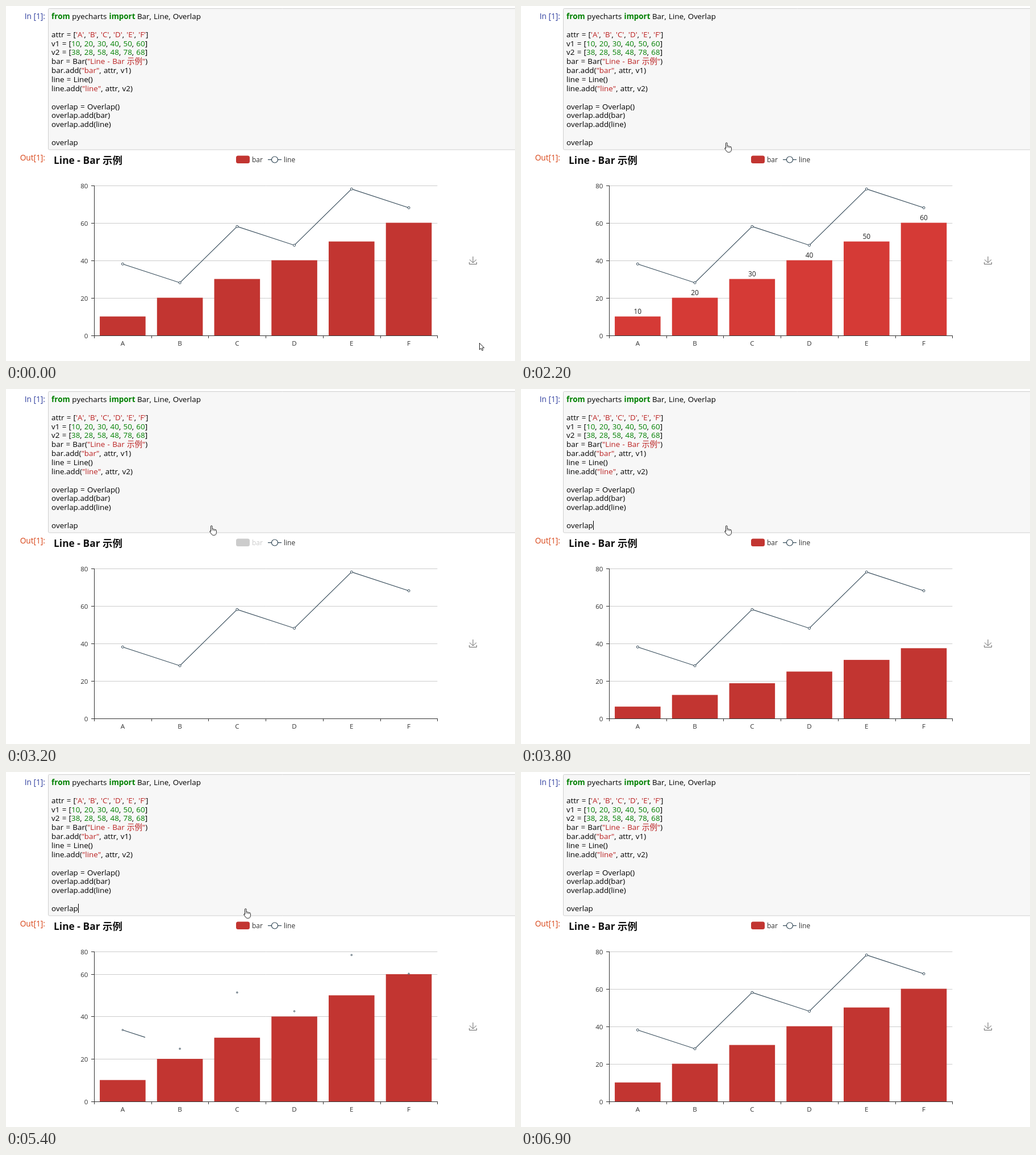
Write an HTML page with a canvas that moves like this. It is 896 px wide and 625 px high and loops after 8400 ms.

```html
<!DOCTYPE html>
<html lang="en">
<head>
<meta charset="utf-8">
<style>
  html, body { margin: 0; width: 100%; height: 100%; overflow: hidden; background: #fff; }
  canvas { display: block; }
</style>
</head>
<body>
<canvas id="stage" width="896" height="625"></canvas>
<script>
const ctx = document.getElementById('stage').getContext('2d');
const LOOP = 8400, STEP = 100;
const FONT = '"Open Sans", "Noto Sans CJK SC", "Noto Sans CJK", sans-serif';
const RED = '#c23531', RED_HOVER = '#d53a36', NAVY = '#2f4554', DARK = '#333', OFF = '#ccc';
const LEFT = 155, WIDTH = 604.4, BASE = 579.6, HEIGHT = 264, BAND = WIDTH / 6;
const AXIS = Math.round(BASE);
const bars = [10, 20, 30, 40, 50, 60], points = [38, 28, 58, 48, 78, 68];

const source = `from pyecharts import Bar, Line, Overlap

attr = ['A', 'B', 'C', 'D', 'E', 'F']
v1 = [10, 20, 30, 40, 50, 60]
v2 = [38, 28, 58, 48, 78, 68]
bar = Bar("Line - Bar 示例")
bar.add("bar", attr, v1)
line = Line()
line.add("line", attr, v2)

overlap = Overlap()
overlap.add(bar)
overlap.add(line)

overlap`.split('\n');

// Pointer positions: time, x, y
const pointerPath = [
  [0, 833, 593], [400, 833, 593], [600, 830, 575], [900, 808, 465], [1300, 768, 323],
  [1400, 715, 292], [1500, 640, 258], [1600, 560, 231], [1800, 450, 207], [2000, 380, 222],
  [2200, 358, 240], [3900, 358, 240], [4300, 418, 240], [5400, 418, 240], [5600, 385, 195],
  [5900, 245, 127], [6100, 145, 148], [6200, 109, 189], [6300, 72, 290], [6600, 2, 612]
];
const caretTimes = [[2700, 3200], [3700, 4200], [4600, 5100], [5400, 5900], [6400, 6900]];

const clamp = v => Math.max(0, Math.min(1, v));
const easeOut = v => 1 - (1 - clamp(v)) ** 3;
const within = (t, from, to) => t >= from && t < to;
const centre = i => LEFT + BAND * (i + 0.5);
const yAt = (value, max) => BASE - HEIGHT * value / max;

function text(str, x, y, { size = 12, color = DARK, align = 'left', weight = 400 } = {}) {
  ctx.font = `${weight} ${size}px ${FONT}`;
  ctx.fillStyle = color;
  ctx.textAlign = align;
  ctx.fillText(str, x, y);
  return ctx.measureText(str).width;
}

function stroke(coords, color, width = 1) {
  ctx.strokeStyle = color;
  ctx.lineWidth = width;
  ctx.beginPath();
  coords.forEach(([x, y]) => ctx.lineTo(x, y));
  ctx.stroke();
}

function ring(x, y, r, color, width = 1) {
  ctx.beginPath();
  ctx.arc(x, y, r, 0, Math.PI * 2);
  ctx.fillStyle = '#fff';
  ctx.strokeStyle = color;
  ctx.lineWidth = width;
  ctx.fill();
  ctx.stroke();
}

function drawCode(t) {
  ctx.fillStyle = '#f7f7f7';
  ctx.strokeStyle = '#cfcfcf';
  ctx.lineWidth = 1;
  ctx.beginPath();
  ctx.roundRect(74.5, 4.5, 840, 248.5, 2);
  ctx.fill();
  ctx.stroke();
  text('In [1]:', 69, 22.5, { size: 13.7, color: '#303f9f', align: 'right' });
  text('Out[1]:', 69, 272, { size: 13.7, color: '#d84315', align: 'right' });
  ctx.save();
  ctx.fontKerning = 'none';
  ctx.wordSpacing = '0.8px';
  source.forEach((line, i) => {
    let x = 80;
    for (const part of line.split(/("[^"]*"|'[^']*'|\b\d+|\bfrom\b|\bimport\b)/)) {
      const keyword = part === 'from' || part === 'import';
      const color = /^["']/.test(part) ? '#ba2121' : keyword || /^\d/.test(part) ? '#008000' : '#000';
      x += text(part, x, 23 + 15.86 * i, { size: 13.4, color, weight: keyword ? 700 : 400 });
    }
  });
  ctx.restore();
  if (caretTimes.some(([from, to]) => within(t, from, to))) {
    ctx.fillStyle = '#000';
    ctx.fillRect(127, 232, 1, 16);
  }
}

function drawLegend(t) {
  const barOff = within(t, 2700, 3600), lineOff = within(t, 4600, 5400);
  text('Line - Bar 示例', 84, 278, { size: 17.4, color: '#111', weight: 700 });
  ctx.fillStyle = barOff ? OFF : RED;
  ctx.beginPath();
  ctx.roundRect(405, 263.5, 24, 13.5, 3.5);
  ctx.fill();
  text('bar', 433, 275, { color: barOff ? OFF : DARK });
  const color = lineOff ? OFF : NAVY;
  stroke([[461, 270.5], [485, 270.5]], color, 1.2);
  ring(473, 270.5, 5.5, color, 1.2);
  text('line', 489, 275, { color: lineOff ? OFF : DARK });
}

function drawAxes(t, max) {
  const ticks = [0, 20, 40, 60].map(v => [v, yAt(v, max)]);
  if (within(t, 4600, 5400)) [10, 30, 50].forEach(v => ticks.push([v, yAt(v, 60)]));
  else ticks.push([80, yAt(80, 80)]);
  for (const [value, exact] of ticks) {
    const y = Math.round(exact) + 0.5;
    if (value) stroke([[LEFT, y], [LEFT + WIDTH, y]], OFF);
    stroke([[LEFT - 5, y], [LEFT, y]], DARK);
    text(value, 144.5, y + 4, { size: 11.6, align: 'right' });
  }
  stroke([[LEFT + 0.5, AXIS - HEIGHT], [LEFT + 0.5, AXIS + 1]], DARK);
  stroke([[LEFT, AXIS + 0.5], [LEFT + WIDTH + 0.6, AXIS + 0.5]], DARK);
  for (let i = 0; i <= 6; i++) {
    const x = Math.round(LEFT + BAND * i) + 0.5;
    stroke([[x, AXIS], [x, AXIS + 5]], DARK);
  }
  [...'ABCDEF'].forEach((name, i) => text(name, centre(i), 598, { size: 11.6, align: 'center' }));
}

function drawBars(t, max) {
  if (within(t, 3000, 3600)) return;
  const hover = within(t, 2100, 3000);
  const shrink = within(t, 2700, 3000) ? 1 - easeOut((t - 2650) / 300) : 1;
  const grow = t >= 3600 ? easeOut((t - 3550) / 900) : 1;
  bars.forEach((value, i) => {
    const top = yAt(value, max), x = LEFT + BAND * (i + 0.1);
    ctx.fillStyle = hover ? RED_HOVER : RED;
    ctx.fillRect(x, AXIS, BAND * 0.8 * shrink, (top - AXIS) * grow);
    if (hover && t < 2700) text(value, centre(i), top - 4.6, { align: 'center', color: '#222' });
  });
}

function drawLine(t) {
  const coords = points.map((v, i) => [centre(i), yAt(v, 80)]);
  if (!within(t, 4600, 5400)) {
    const reveal = t < 4600 ? 1 : clamp(0.149 + (t - 5400) * 0.00088);
    ctx.save();
    ctx.beginPath();
    ctx.rect(LEFT, 300, WIDTH * reveal, 290);
    ctx.clip();
    stroke(coords, NAVY, 1.1);
    ctx.restore();
  }
  const hover = within(t, 4300, 4600);
  let radius = hover ? 3.6 : 2;
  if (within(t, 4600, 5400)) radius = 3.6 * (1 - easeOut((t - 4600) / 300));
  else if (t >= 5400) radius = 2 * easeOut((t - 5319) / 300);
  if (radius < 0.1) return;
  coords.forEach(([x, y], i) => {
    ring(x, y, radius, NAVY);
    if (hover) text(points[i], x, y - 8, { align: 'center', color: '#222' });
  });
}

function drawDownload() {
  stroke([[816, 446.5], [822, 452], [828, 446.5]], '#666');
  stroke([[815.5, 451], [815.5, 454.5], [828.5, 454.5], [828.5, 451]], '#666');
  stroke([[822, 441], [822, 452]], '#666');
}

const arrow = new Path2D('M.5 .5V12L3.2 9.6L5 13.6L6.9 12.8L5.2 8.9H8.8Z');
const hand = new Path2D('M2.5 11V1.9Q2.5 .6 3.7 .6T5 1.9V6.4Q6.6 5.6 7.3 7Q8.8 6.4 9.6 7.8' +
  'Q12.4 7 12.4 9.6V12.5Q12.2 17.3 8.6 17.4H6.4Q4.6 17.2 3.4 15L.8 11.2Q.3 9.3 2.5 10.2');

function drawPointer(t) {
  if (t >= 6900) return;
  const next = pointerPath.findIndex(key => key[0] > t);
  const b = pointerPath.at(next), a = next < 0 ? b : pointerPath[next - 1];
  const k = a === b ? 0 : (t - a[0]) / (b[0] - a[0]);
  const shape = within(t, 2100, 5500) ? hand : arrow;
  ctx.save();
  ctx.translate(a[1] + (b[1] - a[1]) * k, a[2] + (b[2] - a[2]) * k);
  ctx.fillStyle = '#fff';
  ctx.strokeStyle = '#222';
  ctx.lineWidth = 1;
  ctx.fill(shape);
  ctx.stroke(shape);
  if (shape === hand) {
    stroke([[5, 6.4], [5, 9.5]], '#222', 0.7);
    stroke([[7.4, 7], [7.4, 9.8]], '#222', 0.7);
    stroke([[9.7, 7.8], [9.7, 10.2]], '#222', 0.7);
  }
  ctx.restore();
}

// The value axis rescales between 80 and 60 while the line is switched off.
function axisMax(t) {
  let p = 0;
  if (within(t, 4600, 5400)) p = easeOut((t - 4566) / 300);
  else if (t >= 5400) p = 1 - easeOut((t - 5319) / 300);
  return 1 / ((1 - p) / 80 + p / 60);
}

function draw(now) {
  const t = Math.floor((now % LOOP) / STEP) * STEP;
  const max = axisMax(t);
  ctx.fillStyle = '#fff';
  ctx.fillRect(0, 0, 896, 625);
  drawCode(t);
  drawLegend(t);
  drawAxes(t, max);
  drawBars(t, max);
  drawLine(t);
  drawDownload();
  drawPointer(t);
}

let start;
function tick(now) {
  start ??= now;
  draw(now - start);
  requestAnimationFrame(tick);
}
requestAnimationFrame(tick);
</script>
</body>
</html>
```
